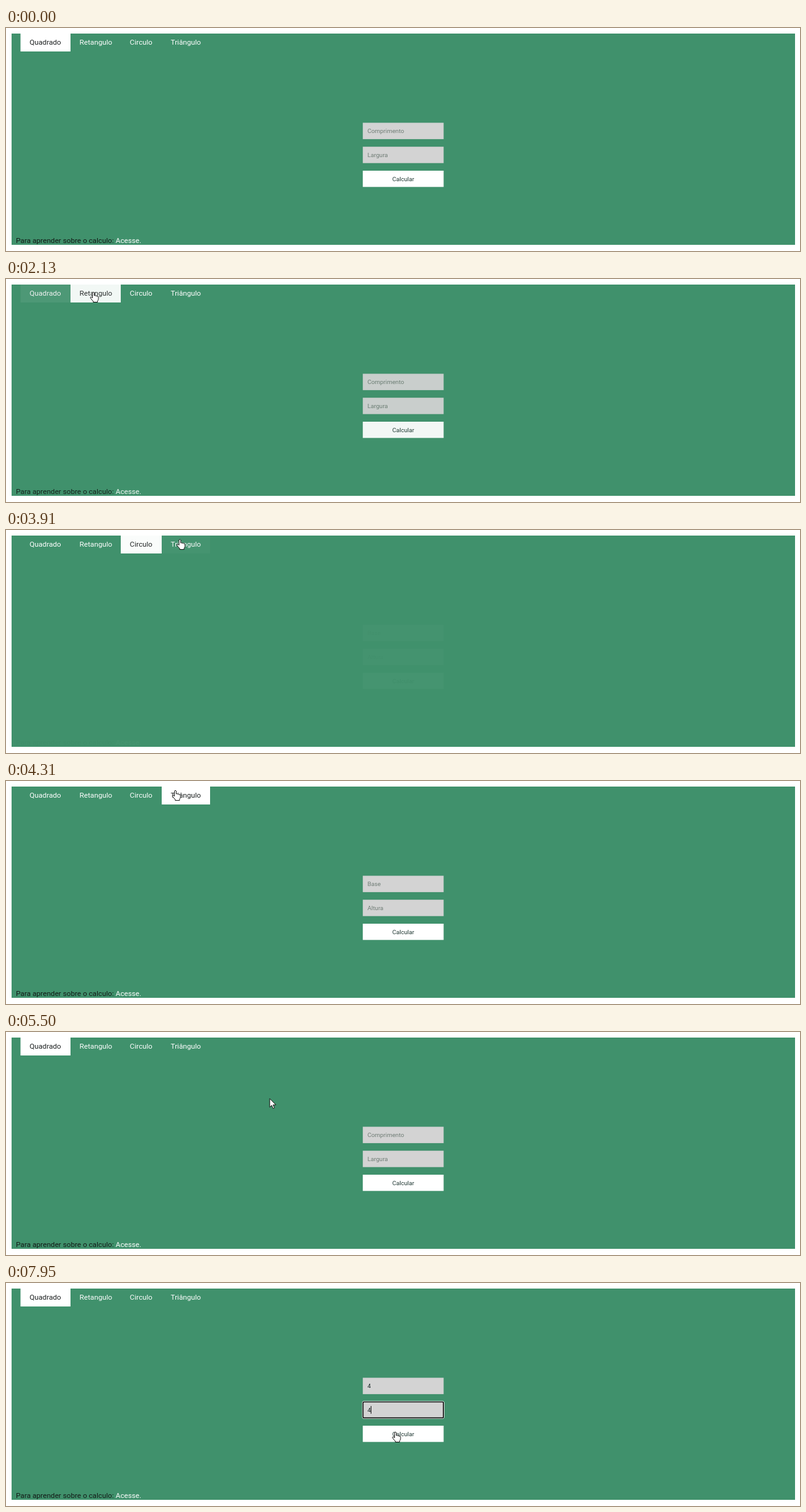
Recreate the animation shown at these times as an HTML page. Size 1280x361 px, loop 8000 ms.

```html
<!DOCTYPE html>
<html lang="pt">
<head>
<meta charset="utf-8">
<title>Calculo de áreas</title>
<style>
  html, body { margin: 0; width: 100%; height: 100%; overflow: hidden; background: #fff; }
  svg { display: block; width: 1280px; height: 361px; }
  text { font: 11.7px Roboto, sans-serif; white-space: pre; }
  .small { font-size: 9.73px; }
</style>
</head>
<body>
<svg id="stage" viewBox="0 0 1280 361"></svg>
<script>
const LOOP = 8000, FADE = 400, LAG = 28, BLINK = 530;
const DARK = [28, 32, 32];
const svg = document.getElementById('stage');

function el(tag, attrs, parent = svg, label) {
  const node = document.createElementNS('http://www.w3.org/2000/svg', tag);
  for (const k in attrs) node.setAttribute(k, attrs[k]);
  if (label) node.textContent = label;
  parent.appendChild(node);
  return node;
}
const rect = (x, y, width, height, fill, parent, more) =>
  el('rect', { x, y, width, height, fill, ...more }, parent);
const text = (x, y, label, fill, parent, more) =>
  el('text', { x, y, fill, ...more }, parent, label);
const show = (node, on) => node.setAttribute('visibility', on ? 'visible' : 'hidden');

rect(9, 9, 1263, 342, '#40916c');

const tabs = [
  ['Quadrado', 23.4, 104], ['Retangulo', 104, 185],
  ['Circulo', 185, 251], ['Triângulo', 251, 329]
].map(([name, x, end]) => ({
  box: rect(x, 9, end - x, 29, '#fff'),
  label: text(x + 14.6, 27, name, '#fff')
}));

// Each panel: placeholders, field tops and button top
const panels = [
  [['Comprimento', 'Largura'], [153.4, 192.2], 231],
  [['Comprimento', 'Largura'], [153.4, 192.2], 231],
  [['Raio'], [163, 0], 222],
  [['Base', 'Altura'], [153.4, 192.2], 231]
].map(([names, tops, button]) => {
  const g = el('g', {});
  const fields = names.map((name, i) => {
    rect(575.2, tops[i], 130.3, 26.5, '#d3d3d3', g);
    return text(582.7, tops[i] + 17, name, '#707d76', g, { class: 'small' });
  });
  rect(575.2, button, 130.3, 26.3, '#fff', g);
  text(640.4, button + 16.8, 'Calcular', '#1d3530', g, { class: 'small', 'text-anchor': 'middle' });
  text(16, 347.6, 'Para aprender sobre o calculo:', '#121a16', g);
  text(176.8, 347.6, 'Acesse.', '#fff', g);
  return { g, fields };
});

const focus = el('g', { fill: 'none' });
rect(574.4, 152.6, 131.9, 28.1, 'none', focus, { rx: 2.5, stroke: '#fff' });
rect(575.5, 153.7, 129.7, 25.9, 'none', focus, { rx: 1.5, stroke: '#101010', 'stroke-width': 1.7 });
const caret = rect(0, 0, 1, 12.5, '#111', focus);

const halo = el('circle', { r: 9, fill: '#ff0', opacity: 0.55 });
const outline = { fill: '#fff', stroke: '#111', 'stroke-width': 1, 'stroke-linejoin': 'round' };
const pointers = {
  arrow: el('path', { d: 'M0 0V14L3.2 11L5.4 16L7.6 15L5.5 10.2H10Z', ...outline }),
  hand: el('path', { d: 'M-1.6 1.2Q-.2-.8 1.2 1.2V6Q2.6 5 3.8 6.4Q5 5.6 6 7Q7.8 6.6 8 8.4V11.5Q7.6 13.5 6.6 14.5V16.5H-.4V15Q-3.4 12-5 9.4Q-4.8 7.4-3 8.2L-1.6 9.6Z', ...outline }),
  beam: el('path', { d: 'M-2.5-5.5H-.6L0-5L.6-5.5H2.5M0-5V5M-2.5 5.5H-.6L0 5L.6 5.5H2.5', fill: 'none', stroke: '#222' })
};

// time, x, y
const path = [
  [515, 645, 348], [800, 330, 150], [1060, 78, 46], [1310, 146, 28], [1580, 141, 21],
  [2390, 141, 21], [2930, 211, 19], [3080, 211, 19], [3380, 262, 19], [3650, 280.5, 15],
  [4260, 280.5, 15], [4640, 78, 13], [4770, 64, 16.5],
  [5240, 64, 16.5], [5690, 622, 157.5], [5770, 622, 157.5], [5830, 622, 161.5],
  [7320, 622, 161.5], [7660, 646, 207], [7870, 646, 207], [7885, 640, 238], [7945, 628, 241]
];
// time, chosen tab
const picks = [[-1000, 0], [1775, 1], [2970, 2], [3835, 3], [4965, 0]];
const FOCUS1 = 5695, TYPE1 = 7285, FOCUS2 = 7675, TYPE2 = 7885;
const clicks = [...picks.map(p => p[0]), FOCUS1, FOCUS2];

const clamp = v => Math.max(0, Math.min(1, v));
const inOut = v => v < 0.5 ? 2 * v * v : 1 - 2 * (1 - v) ** 2;

function position(t) {
  const i = path.findIndex(p => p[0] > t);
  if (i < 0) return path[path.length - 1].slice(1);
  if (i === 0) return path[0].slice(1);
  const [t0, x0, y0] = path[i - 1], [t1, x1, y1] = path[i];
  const k = inOut((t - t0) / (t1 - t0));
  return [x0 + (x1 - x0) * k, y0 + (y1 - y0) * k];
}

function pointerKind(x, y) {
  if (y < 38 && x > 23 && x < 329) return 'hand';
  if (x < 575 || x > 705) return 'arrow';
  if (y > 231 && y < 258) return 'hand';
  return (y > 153 && y < 180) || (y > 192 && y < 219) ? 'beam' : 'arrow';
}

function drawTabs(t) {
  let n = 0;
  picks.forEach((p, i) => { if (t >= p[0] + LAG) n = i; });
  const [start, now] = picks[n];
  const before = n ? picks[n - 1][1] : 0;
  const k = inOut(clamp((t - start - LAG) / FADE));
  tabs.forEach(({ box, label }, i) => {
    const w = i === now ? k : i === before ? 1 - k : 0;
    box.setAttribute('opacity', w);
    label.setAttribute('fill', `rgb(${DARK.map(c => Math.round(255 + (c - 255) * w))})`);
  });
  panels.forEach(({ g }, i) => {
    show(g, i === now);
    g.setAttribute('opacity', k);
  });
}

function drawField(node, typed, name) {
  node.textContent = typed ? '4' : name;
  node.setAttribute('fill', typed ? '#1d2a2a' : '#707d76');
}

function drawForm(t) {
  const [first, second] = panels[0].fields;
  drawField(first, t >= TYPE1, 'Comprimento');
  drawField(second, t >= TYPE2, 'Largura');
  const low = t >= FOCUS2;
  const typed = low ? t >= TYPE2 : t >= TYPE1;
  const since = [FOCUS1, TYPE1, FOCUS2, TYPE2].filter(s => s <= t).pop();
  focus.setAttribute('display', t >= FOCUS1 ? 'inline' : 'none');
  focus.setAttribute('transform', `translate(0 ${low ? 38.8 : 0})`);
  caret.setAttribute('x', typed ? 588 : 582.4);
  caret.setAttribute('y', 160.3);
  show(caret, Math.floor((t - since) / BLINK) % 2 === 0);
}

function drawPointer(t) {
  const [x, y] = position(t);
  const kind = pointerKind(x, y);
  for (const name in pointers) {
    show(pointers[name], t >= path[0][0] && name === kind);
    pointers[name].setAttribute('transform', `translate(${x} ${y})`);
  }
  show(halo, clicks.some(c => t >= c && t < c + 70));
  halo.setAttribute('cx', x - 0.5);
  halo.setAttribute('cy', y - 2);
}

function draw(t) {
  drawTabs(t);
  drawForm(t);
  drawPointer(t);
}

const began = performance.now();
function tick() {
  draw((performance.now() - began) % LOOP);
  requestAnimationFrame(tick);
}
draw(0);
requestAnimationFrame(tick);
</script>
</body>
</html>
```
